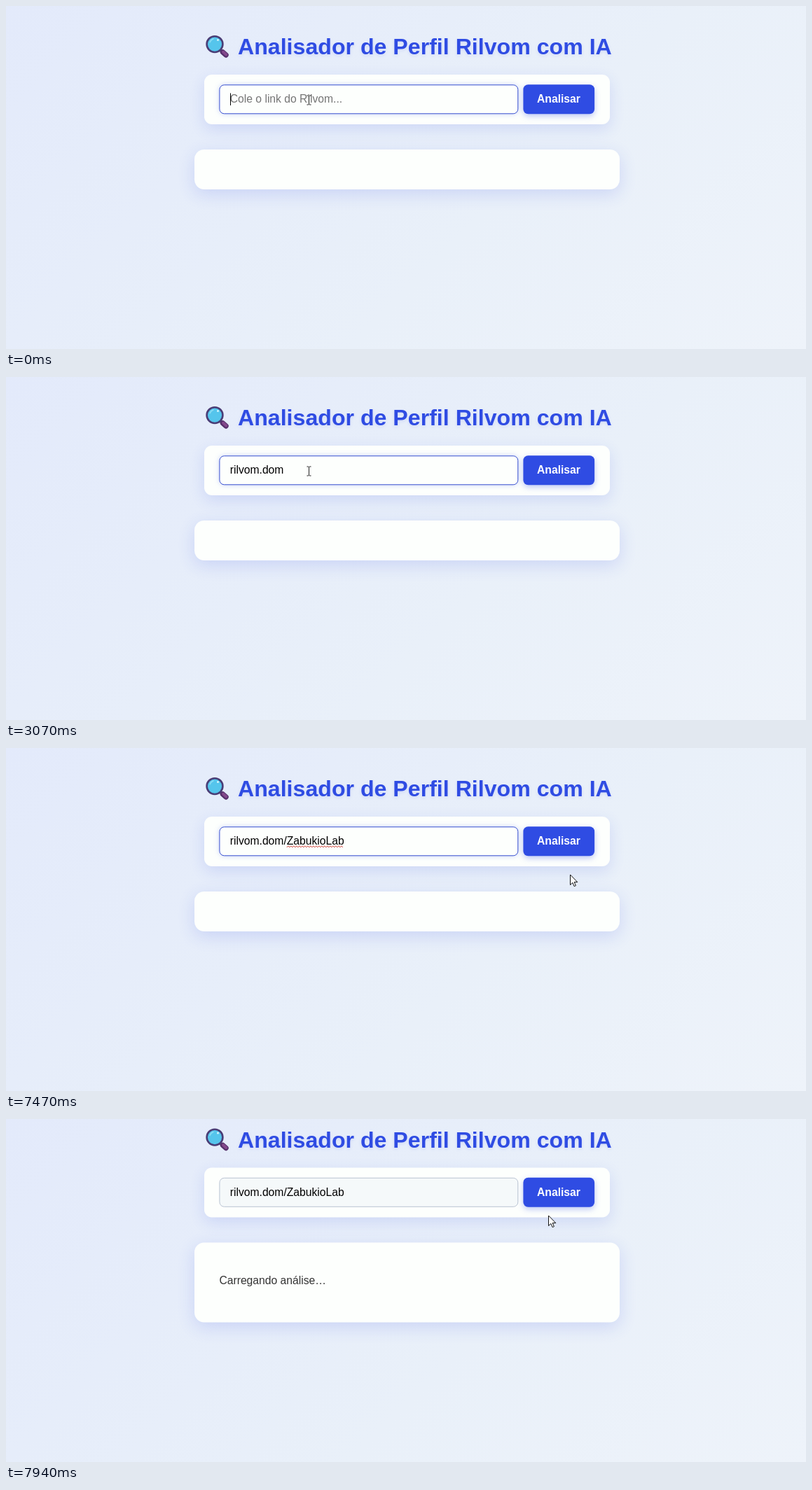
An HTML page for the animation above (8000 ms loop, 1142 px wide and 490 px high).

```html
<!DOCTYPE html>
<html lang="pt-BR">
<head>
<meta charset="utf-8">
<title>Analisador de Perfil</title>
<style>
  html, body { margin: 0; width: 100%; height: 100%; overflow: hidden; }
  body {
    position: relative;
    background: linear-gradient(135deg, #e3eafb, #e9f0f9 60%, #eef3fa);
    font-family: "Liberation Sans", Arial, sans-serif;
  }
  #page, svg { position: absolute; left: 0; top: 0; width: 1142px; height: 490px; }
  #page { --focus: 1; --hot: 0; }
  #page.loading { transform: translateY(-28.5px); }
  .card { position: absolute; background: #fdfffd; }
  #form {
    left: 283px; top: 98px; width: 578.5px; height: 70.5px; border-radius: 11px;
    box-shadow: 0 7px 21px rgba(48, 76, 228, .14);
  }
  #result {
    left: 269px; top: 204.5px; width: 607px; height: 57px; border-radius: 14px;
    box-shadow: 0 7px 25px rgba(48, 76, 228, .16);
  }
  .loading #result { height: 114px; }
  #field {
    fill: #fdfffd;
    stroke: color-mix(in srgb, #3850d0 calc(var(--focus) * 100%), #b9c3d2);
    filter: drop-shadow(0 0 3.5px rgba(48, 76, 228, calc(var(--focus) * .25)));
  }
  #field.off { fill: #f5f9fa; }
  #button {
    fill: color-mix(in srgb, #3048c6 calc(var(--hot) * 100%), #2f4ce3);
    filter: drop-shadow(0 3px 4.5px rgba(48, 76, 228, .32));
  }
  #ring { opacity: var(--hot); filter: drop-shadow(0 2px 3px rgba(48, 76, 228, .3)); }
  text { font-size: 15.7px; white-space: pre; }
  #title {
    font-size: 32.14px; font-weight: bold; fill: #2f4ce3;
    filter: drop-shadow(0 2px 2px rgba(48, 76, 228, .12));
  }
  #label { font-weight: bold; fill: #fff; }
  #hint { fill: #757575; }
  #status { fill: #333; visibility: hidden; }
  .loading #status { visibility: visible; }
</style>
</head>
<body>
<div id="page">
  <div id="form" class="card"></div>
  <div id="result" class="card"></div>
  <svg viewBox="0 0 1142 490">
    <g stroke-linecap="round">
      <path d="M306 63l3 3" stroke="#4b4f78" stroke-width="4"/>
      <path d="M309.5 66l4.5 4" stroke="#56306b" stroke-width="7.4"/>
      <path d="M310 65.5l4.3 4" stroke="#84498c" stroke-width="4"/>
      <circle cx="298" cy="54.6" r="11.4" fill="#55c5ec" stroke="#4a3d76" stroke-width="2.6"/>
      <path d="M291 52a8 8 0 0 1 5-5" fill="none" stroke="#8adcf5" stroke-width="1.5"/>
      <circle cx="302.5" cy="48.5" r="1.5" fill="#d4f4fd"/>
    </g>
    <rect id="field" x="304.9" y="112.8" width="425.9" height="41" rx="6.6"/>
    <rect id="ring" x="735.4" y="109.3" width="107.7" height="47.9" rx="9.5"
      fill="#e6ecff" stroke="#9bb2f3" stroke-width="2.4"/>
    <rect id="button" x="738.4" y="112.3" width="101.7" height="41.9" rx="7"/>
    <text id="title" x="331" y="69">Analisador de Perfil Rilvom com IA</text>
    <text id="label" x="758" y="138">Analisar</text>
    <text id="hint" x="319.7" y="138">Cole o link do Rilvom...</text>
    <text id="typed" x="319.7" y="138"></text>
    <path id="squiggle" fill="none" stroke="#d2453c"/>
    <rect id="caret" y="124.5" width="1" height="17.5"/>
    <text id="status" x="304.4" y="264.5">Carregando análise…</text>
  </svg>
</div>
<svg viewBox="0 0 1142 490">
  <g id="mouse">
    <g id="beam" fill="none">
      <path d="M0-6V6" stroke="#fdfffd" stroke-opacity=".8" stroke-width="3"/>
      <path d="M-3-6.5H-1L0-5.8 1-6.5H3M0-6V6M-3 6.5H-1L0 5.8 1 6.5H3" stroke="#222"/>
    </g>
    <path id="arrow" d="M0 0V14.6L3.4 11.4 5.6 16.6 7.9 15.6 5.7 10.6H10.3Z" fill="#fff" stroke="#111"/>
    <path id="hand" fill="#fff" stroke="#111" stroke-linejoin="round"
      d="M-1.7 11V1.4Q-1.7-.2 0-.2T1.7 1.4V6.6Q4.5 5.8 4.8 7.4 7.2 6.8 7.4 8.5 9.3 8.2 9.3 10V14
         Q9.2 17 7.6 18.6V20.6H-.6V19Q-3 17-5.8 12.3-6.4 10.6-5 10.2-3.6 9.8-1.7 12Z"/>
  </g>
</svg>
<script>
const LOOP = 8000, FPS = 15, LEFT = 319.7;
const ADDRESS = "rilvom.dom/ZabukioLab";
const KEYS = [940, 1200, 1470, 1540, 1670, 1740, 2000, 2140, 2340, 2740, 3600,
              4670, 4800, 4940, 5070, 5270, 5470, 5740, 6200, 6400, 6740];
const CARET_OFF = [[670, 940], [3070, 3600], [4400, 4670], [7270, LOOP]];
const PATH = [[7000, 432.5, 134.5], [7340, 802, 186], [7466, 805.5, 181],
              [7670, 796, 150], [7800, 793, 138], [7933, 774.5, 138]];
const SPELL = 7070, HOVER = 7600, PRESS = 7800, LOAD = 7866;

const el = id => document.getElementById(id);
const clamp = v => Math.max(0, Math.min(1, v));
const show = (id, on) => { el(id).style.visibility = on ? "visible" : "hidden"; };
const type = text => {
  if (el("typed").textContent !== text) el("typed").textContent = text;
  return el("typed").getComputedTextLength();
};

function pointer(t) {
  const i = PATH.findIndex(p => p[0] > t);
  if (i === 0) return PATH[0].slice(1);
  if (i < 0) return PATH[PATH.length - 1].slice(1);
  const [a, b] = [PATH[i - 1], PATH[i]];
  const u = (t - a[0]) / (b[0] - a[0]), k = u * u * (3 - 2 * u);
  return [1, 2].map(n => a[n] + (b[n] - a[n]) * k);
}

function drawSquiggle() {
  const from = LEFT + type(ADDRESS.slice(0, 11)), to = LEFT + type(ADDRESS);
  let d = "";
  for (let x = from, n = 0; x <= to; x += 2, n++) d += `${n ? "L" : "M"}${x} ${n % 2 ? 139.8 : 142}`;
  el("squiggle").setAttribute("d", d);
}

function render(t) {
  const count = KEYS.filter(k => k <= t).length;
  const width = type(ADDRESS.slice(0, count));
  show("hint", !count);
  el("caret").setAttribute("x", Math.round(LEFT + width));
  show("caret", !CARET_OFF.some(([a, b]) => t >= a && t < b));
  show("squiggle", t >= SPELL && t < PRESS - 5);

  // The mouse moves at the recording's frame rate
  const tick = Math.floor((t + 4) * FPS / 1000) * 1000 / FPS;
  const [x, y] = pointer(tick);
  const loading = tick >= LOAD;
  const inRow = !loading && y > 112 && y < 154.5;
  const shape = inRow && x < 731 ? "beam" : inRow && x > 738 && x < 841 ? "hand" : "arrow";
  ["beam", "hand", "arrow"].forEach(id => show(id, id === shape));
  el("mouse").setAttribute("transform", `translate(${x} ${y})`);

  const page = el("page");
  const hot = loading ? 1 - (tick - PRESS) / 133 : (tick - HOVER) / 130;
  page.style.setProperty("--hot", clamp(hot));
  page.style.setProperty("--focus", clamp(1 - (tick - PRESS) / 133));
  page.classList.toggle("loading", loading);
  el("field").classList.toggle("off", tick >= PRESS);
}

function frame() {
  render(performance.now() % LOOP);
  requestAnimationFrame(frame);
}
drawSquiggle();
frame();
</script>
</body>
</html>
```
